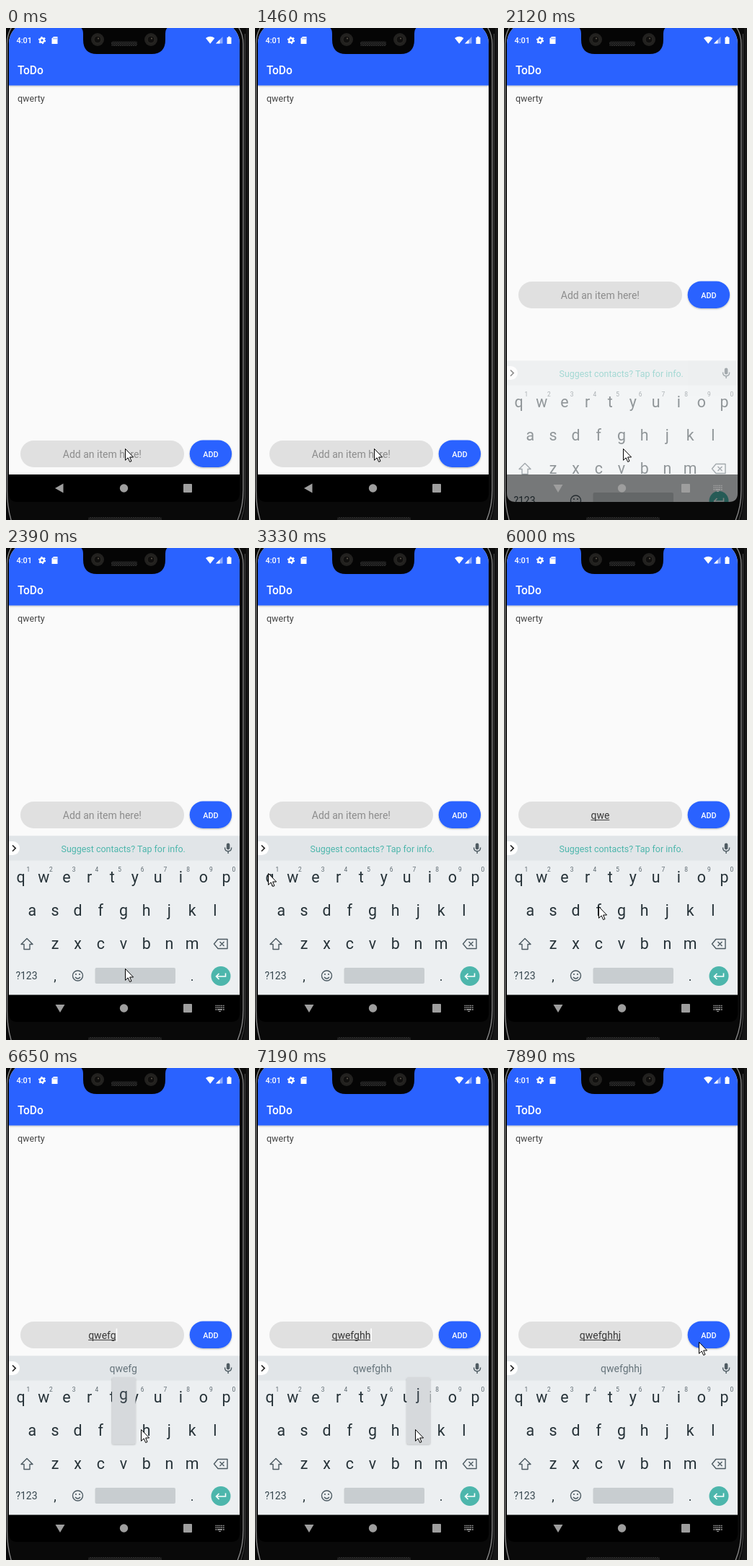
An HTML page for the animation above (8000 ms loop, 337x681 px).

```html
<!DOCTYPE html>
<html lang="en">
<head>
<meta charset="utf-8">
<title>ToDo</title>
<style>
  html, body { margin: 0; width: 100%; height: 100%; overflow: hidden; background: #000; }
  svg { display: block; width: 100vw; height: 100vh; }
  text { font-family: Roboto, sans-serif; }
  .mid { text-anchor: middle; }
  .key { font-size: 21.4px; fill: #263238; }
  .line { fill: none; stroke: #4c5a62; stroke-width: 1.4; stroke-linejoin: round; }
</style>
</head>
<body>
<svg viewBox="0 0 337 681">
  <defs>
    <clipPath id="screen"><path d="M4 22C4 12 8 5 14 -1H314C320 5 324 12 324 22V644Q324 656 312 656H16Q4 656 4 644Z"/></clipPath>
    <filter id="shade" x="-30%" y="-30%" width="160%" height="170%">
      <feDropShadow dx="0" dy="1" stdDeviation="1.1" flood-opacity=".28"/>
    </filter>
    <pattern id="mesh" width="3" height="3" patternUnits="userSpaceOnUse">
      <rect width="3" height="3" fill="#121212"/>
      <path d="M0 3L3 0M0 0L3 3" stroke="#383838" stroke-width=".6"/>
    </pattern>
  </defs>

  <rect width="337" height="681" fill="#161616"/>
  <path d="M-4 0H333V640Q333 668 326 690H4Q-4 668 -4 640Z" fill="#090909"/>
  <path d="M9 -3Q1.5 8 1.5 22V640Q1.5 664 8 684M321 -3Q329 8 329 22V640Q329 664 320 684" fill="none" stroke="#8c8c8c" stroke-width="1.3"/>
  <path d="M331.5 8V650Q331 668 325 684" fill="none" stroke="#4a4a4a"/>
  <rect x="114" y="677" width="102" height="8" rx="2" fill="url(#mesh)"/>

  <g clip-path="url(#screen)">
    <rect x="4" y="-4" width="320" height="622" fill="#fafafa"/>
    <rect x="4" y="-4" width="320" height="83.5" fill="#2962ff" filter="url(#shade)"/>
    <g fill="#fff">
      <text x="14.5" y="21" font-size="10.9" font-weight="500">4:01</text>
      <circle cx="50" cy="17" r="2.8" fill="none" stroke="#fff" stroke-width="2.2"/>
      <circle cx="50" cy="17" r="4.4" fill="none" stroke="#fff" stroke-width="1.6" stroke-dasharray="2.2 2.4"/>
      <path d="M66 12H71.5V22H63.5V14.5Z"/>
      <path d="M66 13.5V15.5M68 13.5V15.5M70 13.5V15.5" stroke="#2962ff" stroke-width=".8"/>
      <path d="M277 14Q283.2 9.5 289.4 14L283.2 21.8Z"/>
      <path d="M300.5 12V21.5H291Z" opacity=".45"/>
      <path d="M296.5 16V21.5H291Z"/>
      <path d="M306.5 13H308V11.8H311V13H312.5V22H306.5Z"/>
      <text x="16" y="63.5" font-size="15.6" font-weight="500">ToDo</text>
    </g>
    <text x="16" y="102" font-size="12.5" fill="#424242">qwerty</text>

    <g id="bar">
      <rect x="20" y="571" width="227" height="37" rx="18.5" fill="#e0e0e0"/>
      <text id="field" class="mid" x="133.4" font-size="14"></text>
      <path id="under" stroke="#444" stroke-width="1"/>
      <rect id="caret" y="580.5" width="1.6" height="18" fill="#fff"/>
      <rect x="254.7" y="570.6" width="58.4" height="37.4" rx="18.7" fill="#2962ff" filter="url(#shade)"/>
      <text class="mid" x="284" y="593.7" font-size="10.9" font-weight="500" fill="#fff">ADD</text>
    </g>

    <rect x="4" y="618" width="320" height="40" fill="#000"/>

    <g id="board">
      <rect x="4" y="398.5" width="320" height="220" fill="#eceff1"/>
      <rect x="4" y="398.5" width="320" height="34" fill="#e1e5e8"/>
      <rect x="-6" y="406" width="25" height="19" rx="9.5" fill="#fff"/>
      <path d="M9 411.5L13.2 415.6L9 419.7" fill="none" stroke="#222" stroke-width="1.6"/>
      <text id="hint" class="mid" x="162.7"></text>
      <rect x="305.8" y="408.5" width="4.6" height="9" rx="2.3" fill="#4f5b62"/>
      <path class="line" d="M303.5 414.5Q303.5 419.7 308.1 419.7T312.7 414.5M308.1 419.7V423"/>
      <g id="keys"></g>
      <path class="line" d="M29 540.5L37 548.5H33V555.5H25V548.5H21Z"/>
      <path class="line" d="M294 541.5H307V554.5H294L288.5 548ZM296.5 545L302.5 551M302.5 545L296.5 551"/>
      <text class="mid" x="28.5" y="597" font-size="14" fill="#37474f">?123</text>
      <text class="key mid" x="68" y="598.5" style="font-size:18px">,</text>
      <text class="key mid" x="258" y="598.5" style="font-size:18px">.</text>
      <circle class="line" cx="99.5" cy="592" r="7"/>
      <path class="line" d="M96 594Q99.500 598 103 594"/>
      <circle cx="97" cy="590" r="1.1" fill="#4c5a62"/>
      <circle cx="102" cy="590" r="1.1" fill="#4c5a62"/>
      <rect x="123.5" y="581" width="111.5" height="22" rx="2" fill="#c8cdd0"/>
      <circle cx="298" cy="592.5" r="13.5" fill="#4db6ac"/>
      <path d="M304.5 588.5V593H292M295.5 589L291.5 593L295.5 597" fill="none" stroke="#fff" stroke-width="1.6"/>
    </g>

    <g fill="#9e9e9e">
      <path id="back"/>
      <circle cx="163.5" cy="637" r="5.7"/>
      <rect x="246" y="631" width="12" height="12" rx="1"/>
      <g id="switch" stroke="#9e9e9e" stroke-width="1.6">
        <path d="M290.5 633.5H302.7M290.5 636.2H302.7" stroke-dasharray="1.7 .9"/>
        <path d="M290.5 638.9H292.2M293.2 638.9H300M301 638.9H302.7"/>
        <path d="M295 641.4H298.2" stroke-width="1"/>
      </g>
    </g>
  </g>

  <path d="M103 -1Q107 1 107 8V16Q107 36 126 36H202Q221 36 221 16V8Q221 1 225 -1Z" fill="#050505"/>
  <g id="lenses"></g>
  <rect x="146" y="18.5" width="36" height="6.5" rx="2" fill="url(#mesh)"/>

  <g id="popup">
    <rect x="-16" y="-74" width="32.5" height="92" rx="2" fill="#d6d9dc" filter="url(#shade)"/>
    <text id="popKey" class="mid" y="-43.5" font-size="21.4" fill="#37424a"></text>
    <text id="popDots" class="mid" x="9.5" y="-34" font-size="10" fill="#455">...</text>
  </g>

  <path id="mouse" d="M.5 .5V16.3L4.2 12.9L6.7 18.5L9 17.5L6.6 12H11.6Z" fill="#fff" stroke="#000" stroke-width="1"/>
</svg>

<script>
const LOOP = 8000, PITCH = 31.68, HINT = 'Add an item here!';
const rows = [
  { keys: 'qwertyuiop', x: 20.5, y: 462.5 },
  { keys: 'asdfghjkl', x: 36.3, y: 508.8 },
  { keys: 'zxcvbnm', x: 68, y: 554.8 }
];
const $ = id => document.getElementById(id);
const set = (el, attrs) => { for (const k in attrs) el.setAttribute(k, attrs[k]); };

// Each track holds its value from the given time on.
const typed = [[0, ''], [4420, 'q'], [4950, 'qw'], [5460, 'qwe'], [6290, 'qwef'],
  [6650, 'qwefg'], [6890, 'qwefgh'], [7190, 'qwefghh'], [7350, 'qwefghhj']];
const pressed = [[0, ''], [4150, 'q'], [4420, ''], [4800, 'w'], [4950, ''], [5340, 'e'], [5610, ''],
  [6140, 'f'], [6290, ''], [6530, 'g'], [6770, 'h'], [7190, 'j'], [7350, '']];
const blink = [[0, 0], [1740, 1], [2120, 0], [2670, 1], [3210, 0], [3720, 1], [4150, 0],
  [4420, 1], [6000, 0], [6290, 1], [7890, 0]];
const slide = [[0, null], [2120, [62, .5]], [2270, [14, .88]], [2390, [0, 1]]];
const pointer = [[0, [165, 582]], [2820, [92, 522]], [2950, [32, 470]], [3090, [20, 456]],
  [3210, [14, 451]], [3330, [18, 450]], [4420, [38, 452]], [4550, [53, 454]],
  [5070, [70, 456]], [5220, [82, 456]], [5340, [86, 456]], [5610, [125, 472]],
  [5750, [130, 492]], [5870, [131, 496]], [6290, [141, 499]], [6410, [158, 500]],
  [6650, [187, 500]], [6770, [193, 500]], [6890, [204, 500]], [7040, [211, 500]],
  [7190, [222, 500]], [7350, [263, 422]], [7500, [267, 394]], [7620, [268, 385]], [7770, [270, 379]]];

function at(track, t) {
  let value = track[0][1];
  for (const [start, v] of track) if (t >= start) value = v;
  return value;
}

function place(key) {
  const row = rows.find(r => r.keys.includes(key));
  return { x: row.x + row.keys.indexOf(key) * PITCH, y: row.y, top: row === rows[0] };
}

function build() {
  let keys = '';
  for (const { keys: letters } of rows) {
    [...letters].forEach((key, i) => {
      const { x, y, top } = place(key);
      keys += `<text class="key mid" x="${x}" y="${y}">${key}</text>`;
      if (top) keys += `<text class="mid" x="${x + 10.3}" y="${y - 14.8}" font-size="8.4" fill="#5c686f">${(i + 1) % 10}</text>`;
    });
  }
  $('keys').innerHTML = keys;
  $('lenses').innerHTML = [127, 201].map(x =>
    `<circle cx="${x}" cy="16" r="9" fill="#22211f"/>
     <circle cx="${x}" cy="16" r="5" fill="#11100f" stroke="#2e2c28"/>
     <circle cx="${x + 1}" cy="14.5" r=".9" fill="#6a6255"/>`).join('');
}

function draw(t) {
  const board = at(slide, t), word = at(typed, t), key = at(pressed, t), [mx, my] = at(pointer, t);

  set($('bar'), { transform: `translate(0 ${board ? -220 : 0})` });
  const field = $('field');
  field.textContent = word || HINT;
  set(field, { y: word ? 595 : 594.5, fill: word ? '#383838' : '#8c8c8c' });
  const half = word ? field.getComputedTextLength() / 2 : 0;
  set($('under'), { d: word ? `M${133.4 - half} 596.5H${133.4 + half}` : '' });
  set($('caret'), { x: 133.4 + half, opacity: at(blink, t) });

  const [drop, alpha] = board || [0, 0];
  set($('board'), { transform: `translate(0 ${drop})`, opacity: alpha });
  const suggest = word.length > 3;
  $('hint').textContent = suggest ? word : 'Suggest contacts? Tap for info.';
  set($('hint'), {
    y: suggest ? 421 : 420.5,
    'font-size': suggest ? 14 : 12.45,
    fill: suggest ? '#66747b' : '#4db6ac'
  });
  set($('switch'), { opacity: board ? 1 : 0 });
  set($('back'), { d: board ? 'M68.5 632H81.5L75 643Z' : 'M79.5 630.5V643.5L68 637Z' });

  set($('popup'), { opacity: key ? 1 : 0 });
  if (key) {
    const { x, y, top } = place(key);
    set($('popup'), { transform: `translate(${x} ${y - 6.5})` });
    $('popKey').textContent = key;
    set($('popDots'), { opacity: top ? 1 : 0 });
  }
  set($('mouse'), { transform: `translate(${mx} ${my})` });
}

build();
const began = performance.now();
function tick() {
  draw((performance.now() - began) % LOOP);
  requestAnimationFrame(tick);
}
tick();
</script>
</body>
</html>
```
